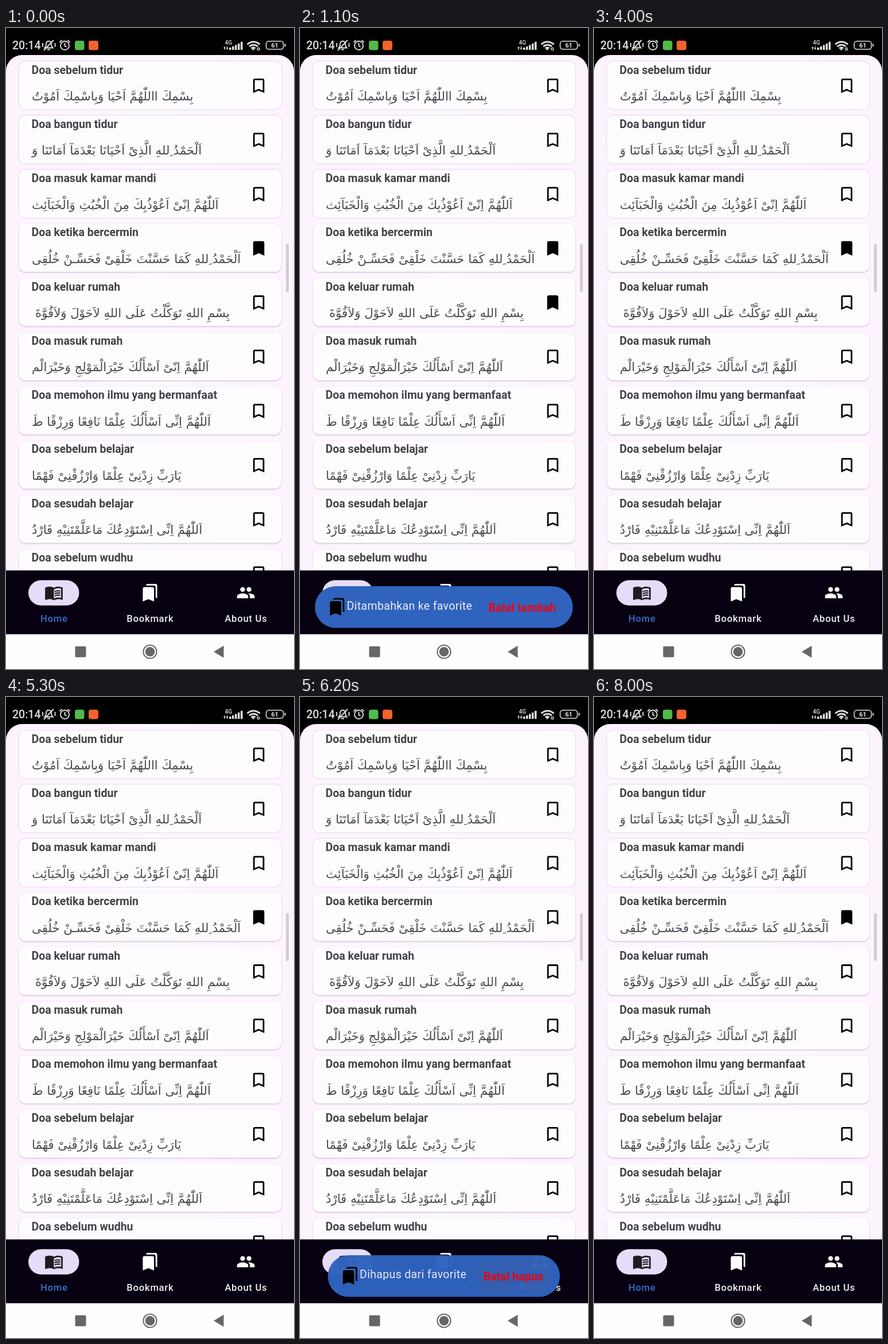
Recreate the animation shown at these times as an HTML page. Size 502x1115 px, loop 8.1 s.

```html
<!DOCTYPE html>
<html lang="id">
<head>
<meta charset="utf-8">
<style>
html, body { margin: 0; width: 100%; height: 100%; overflow: hidden; background: #000; }
svg { display: block; width: 502px; height: 1115px; font-family: Roboto, sans-serif; }
.card { fill: #fefcff; filter: drop-shadow(0 calc(.7px + var(--row) * .12px) 1.2px rgba(50, 40, 60, .3)); }
.title { font-size: 19.5px; font-weight: 700; fill: #444147; }
.arabic { font-family: "DejaVu Sans", sans-serif; font-size: 21.2px; fill: #4b484e; }
.label { font-size: 16.7px; font-weight: 500; letter-spacing: .7px; text-anchor: middle; }
.message { font-size: 19.5px; letter-spacing: .35px; fill: #f1ecf6; }
.action { font-size: 19.5px; font-weight: 700; letter-spacing: .14px; fill: #f5000c; }
</style>
</head>
<body>
<svg viewBox="0 0 502 1115">
  <defs>
    <path id="outline" d="M17 3H7c-1.1 0-2 .9-2 2v16l7-3 7 3V5c0-1.1-.9-2-2-2zm0 15l-5-2.18L7 18V5h10z"/>
    <path id="filled" d="M17 3H7c-1.1 0-2 .9-2 2v16l7-3 7 3V5c0-1.1-.9-2-2-2z"/>
    <path id="bookmarks" d="M19 18l2 1V3c0-1.1-.9-2-2-2H9C7.9 1 7 1.9 7 3h10c1.1 0 2 .9 2 2zM15 5H5c-1.1 0-2 .9-2 2v16l7-3 7 3V7c0-1.1-.9-2-2-2z"/>
    <g id="book">
      <path d="M21 5c-1.1-.35-2.3-.5-3.5-.5-1.95 0-4.05.4-5.5 1.5-1.45-1.1-3.55-1.5-5.5-1.5S2.45 4.9 1 6v14.65c0 .25.25.5.75.45C3.1 20.45 5.05 20 6.5 20c1.95 0 4.05.4 5.5 1.5 1.35-.85 3.8-1.5 5.5-1.5 1.65 0 3.35.3 4.75 1.05.4.1.75-.1.75-.45V6c-.6-.45-1.25-.75-2-1zm0 13.5c-1.1-.35-2.3-.5-3.5-.5-1.7 0-4.15.65-5.5 1.5V8c1.35-.85 3.8-1.5 5.5-1.5 1.2 0 2.4.15 3.5.5z"/>
      <path d="M13 10.7q3-1.6 7-.7M13 13.3q3-1.6 7-.7M13 16q3-1.6 7-.7" fill="none" stroke="#1d1b20" stroke-width="1.5"/>
    </g>
    <path id="people" d="M16 11a3 3 0 1 0 0-6 3 3 0 0 0 0 6zm-8 0a3 3 0 1 0 0-6 3 3 0 0 0 0 6zm0 2c-2.33 0-7 1.17-7 3.5V19h14v-2.5c0-2.33-4.67-3.5-7-3.5zm8 0c-.29 0-.62.02-.97.05 1.16.84 1.97 1.97 1.97 3.45V19h6v-2.5c0-2.33-4.67-3.5-7-3.5z"/>
    <linearGradient id="sheet">
      <stop stop-color="#fdf3fe"/><stop offset=".5" stop-color="#fdf7ff"/><stop offset="1" stop-color="#fdf3fe"/>
    </linearGradient>
    <clipPath id="listArea"><path d="M0 944V75a28 28 0 0 1 28-28H474a28 28 0 0 1 28 28V944z"/></clipPath>
  </defs>
  <rect width="502" height="1115"/>

  <g id="status" fill="#dedede">
    <text x="11" y="37" font-size="19.5" font-weight="500">20:14</text>
    <g fill="none" stroke="#dedede" stroke-width="1.9">
      <path d="M67.500 34.500q2.500-2 2.500-6.500 0-5 4.500-5t4.500 5q0 4.500 2.500 6.500zM72 37.500h5M66 39L83 21M64 26v7M85.500 26v7"/>
      <circle cx="102.500" cy="30.500" r="7.500"/>
      <path d="M102.500 26v5l3 2M93.500 25l4-4M111.500 25l-4-4"/>
      <rect x="453.500" y="23" width="30" height="14" rx="4.500" stroke-width="1.600"/>
    </g>
    <rect x="120" y="22" width="16.500" height="16.500" rx="4" fill="#53b94a"/>
    <rect x="144" y="22" width="17" height="16.500" rx="4" fill="#f4622d"/>
    <text x="381.500" y="29" font-size="10" font-weight="500">4G</text>
    <path d="M379 35l2-3 2 3h-1.300v3h-1.400v-3zM383.500 35l2 3 2-3h-1.300v-3h-1.400v3z"/>
    <path d="M389 34h3.500v4h-3.500zM394 32h3.500v6h-3.500zM399 29.500h3.500v8.500h-3.500zM404 27h3.500v11h-3.500zM409 24h3.500v14h-3.500z"/>
    <g fill="none" stroke="#dedede" stroke-width="3">
      <path d="M420.500 28.500q11-9 22 0M424 32.200q7.500-6 15 0M427.500 35.500q4-3 7 0"/>
      <circle cx="440" cy="36.500" r="2" stroke-width="1.300"/>
    </g>
    <circle cx="431" cy="37" r="1.800"/>
    <rect x="485.500" y="27.500" width="2" height="5" rx="1"/>
    <text x="468.500" y="34" font-size="11" font-weight="700" text-anchor="middle">61</text>
  </g>

  <g clip-path="url(#listArea)">
    <rect y="47" width="502" height="897" fill="url(#sheet)"/>
    <g id="list"></g>
    <rect x="488" y="376" width="5" height="83" rx="2" fill="#d2cbd5"/>
  </g>

  <rect y="943.500" width="502" height="111.500" fill="#060010"/>
  <rect x="39" y="960.500" width="88.500" height="44" rx="22" fill="#e6dcf7"/>
  <g id="nav"></g>
  <g id="snackbars"></g>

  <rect y="1054.500" width="502" height="61" fill="#fefefe"/>
  <g fill="#666">
    <rect x="120.500" y="1075.500" width="19" height="19" rx="2"/>
    <circle cx="251" cy="1085" r="8.300"/>
    <circle cx="251" cy="1085" r="11.600" fill="none" stroke="#666" stroke-width="2"/>
    <path d="M362 1085L379.500 1074.500V1095.500z"/>
  </g>
</svg>
<script>
const LOOP = 8100, STEP = 100, ROW = 94.28, DP = 1.394;
const $ = id => document.getElementById(id);
const clamp = v => Math.min(1, Math.max(0, v));
const icon = (name, x, y, fill = '#000', id = '') =>
  `<use ${id && `id="${id}"`} href="#${name}" fill="${fill}" transform="translate(${x} ${y}) scale(${DP})"/>`;

const prayers = [
  ['sebelum tidur', 'بِسْمِكَ االلّٰهُمَّ اَحْيَا وَبِاسْمِكَ اَمُوْتُ'],
  ['bangun tidur', 'اَلْحَمْدُ ِللهِ الَّذِىْ اَحْيَانَا بَعْدَمَآ اَمَاتَنَا وَ'],
  ['masuk kamar mandi', 'اَللّٰهُمَّ اِنّىْ اَعُوْذُبِكَ مِنَ الْخُبُثِ وَالْخَبَآئِث'],
  ['ketika bercermin', 'اَلْحَمْدُ ِللهِ كَمَا حَسَّنْتَ خَلْقِىْ فَحَسِّـنْ خُلُقِى'],
  ['keluar rumah', 'بِسْمِ اللهِ تَوَكَّلْتُ عَلَى اللهِ لاَحَوْلَ وَلاَقُوَّةَ', 6],
  ['masuk rumah', 'اَللّٰهُمَّ اِنّىْ اَسْأَلُكَ خَيْرَالْمَوْلِجِ وَخَيْرَالْم'],
  ['memohon ilmu yang bermanfaat', 'اَللّٰهُمَّ اِنِّى اَسْأَلُكَ عِلْمًا نَافِعًا وَرِزْقًا طَ'],
  ['sebelum belajar', 'يَارَبِّ زِدْنِىْ عِلْمًا وَارْزُقْنِىْ فَهْمًا'],
  ['sesudah belajar', 'اَللّٰهُمَّ اِنِّى اِسْتَوْدِعُكَ مَاعَلَّمْتَنِيْهِ فَارْدُ'],
  ['sebelum wudhu', '']
];
$('list').innerHTML = prayers.map(([name, arabic, indent = 0], i) => `
  <g transform="translate(0 ${i * ROW})" style="--row: ${i}">
    <rect class="card" x="22.500" y="58" width="457.500" height="83.500" rx="11.500"/>
    <text class="title" x="44.500" y="79.500">Doa ${name}</text>
    <text class="arabic" x="${45 + indent}" y="126">${arabic}</text>
    ${icon('outline', 423.8, 83.8, '#000', 'mark' + i)}
  </g>`).join('');

$('nav').innerHTML = [
  ['Home', 'book', 83.5, '#1d1b20', '#3a6dcb'],
  ['Bookmark', 'bookmarks', 251, '#fff', '#f1edf5'],
  ['About Us', 'people', 418, '#fff', '#f1edf5']
].map(([name, glyph, x, fill, color]) =>
  icon(glyph, x - 12 * DP, 965.5, fill) +
  `<text class="label" x="${x + .35}" y="1032.500" fill="${color}">${name}</text>`).join('');

const snackbars = [
  { id: 'added', left: 26, right: 475.5, button: 313, message: 'Ditambahkan ke favorite', action: 'Batal tambah',
    enter: 515, press: 3000, exit: 3098 },
  { id: 'removed', left: 48.5, right: 453, button: 304, message: 'Dihapus dari favorite', action: 'Batal hapus',
    enter: 5415, press: 6100, exit: 6198 }
];
$('snackbars').innerHTML = snackbars.map(s => `
  <g id="${s.id}">
    <rect x="${s.left}" y="971" width="${s.right - s.left}" height="72.500" rx="36" fill="#2f63be"/>
    <rect id="${s.id}Ripple" x="${s.button}" y="979" width="${s.right - 12 - s.button}" height="56" rx="28" fill="#3562b7"/>
    ${icon('bookmarks', s.left + 22, 990)}
    <text class="message" x="${s.left + 55.5}" y="1011.500">${s.message}</text>
    <text class="action" x="${s.button + 15.5}" y="1015">${s.action}</text>
  </g>`).join('');

// Standard "fast out, slow in" curve: cubic-bezier(.4, 0, .2, 1)
function ease(x) {
  let lo = 0, hi = 1;
  for (let i = 0; i < 20; i++) {
    const u = (lo + hi) / 2, v = 1 - u;
    if (1.2 * v * v * u + .6 * v * u * u + u ** 3 < x) lo = u; else hi = u;
  }
  return 3 * (1 - lo) * lo * lo + lo ** 3;
}

function drawSnackbar(s, t) {
  const enter = ease(clamp((t - s.enter) / 150));
  const leave = clamp((t - s.exit) / 75);
  const scale = .8 + .2 * enter * (1 - ease(leave));
  $(s.id).setAttribute('opacity', enter * (1 - leave));
  $(s.id).setAttribute('transform', `translate(251 1007) scale(${scale}) translate(-251 -1007)`);
  $(s.id + 'Ripple').setAttribute('opacity', t >= s.press ? 1 : 0);
}

const setMark = (i, on) => $('mark' + i).setAttribute('href', on ? '#filled' : '#outline');

function draw() {
  const t = Math.floor(performance.now() % LOOP / STEP) * STEP;
  setMark(3, t < 5400 || t >= 6300);
  setMark(4, t >= 500 && t < 3100);
  snackbars.forEach(s => drawSnackbar(s, t));
  requestAnimationFrame(draw);
}
draw();
</script>
</body>
</html>
```
